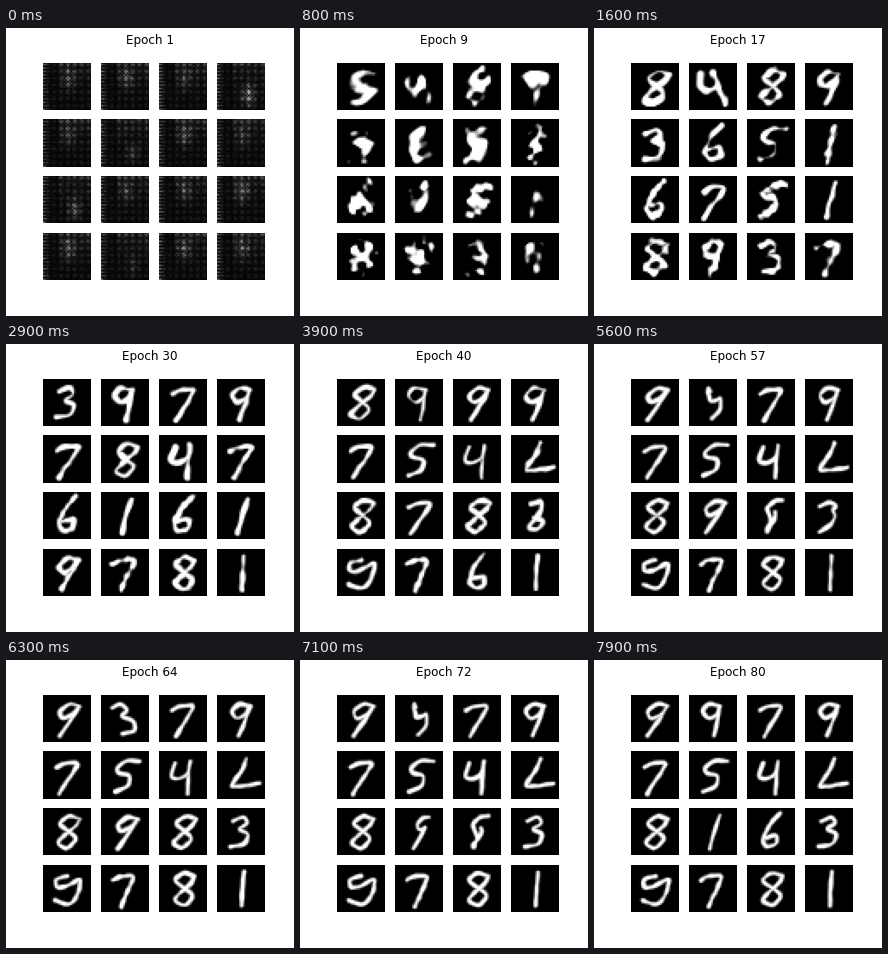
A matplotlib script that plays this animation: 288 by 288 pixels, repeating every 8000 ms.

```python
import numpy as np
import matplotlib.pyplot as plt
from matplotlib.animation import FuncAnimation

EPOCHS = 80
ROWS = COLS = 4
N = 28            # pixels per side of a digit
SAMPLES = 90

# one pen path (x, y, x, y, ...) per handwriting shape, in a box of 47 units
GLYPHS = {
    "1": (29, 8, 25, 24, 22, 41),
    "2": (19, 13, 29, 10, 30, 20, 17, 37, 29, 38, 33, 29, 23, 27),
    "3": (15, 14, 25, 9, 30, 16, 20, 22, 32, 26, 29, 37, 15, 39),
    "4": (16, 12, 11, 26, 19, 28, 29, 23, 31, 7, 29, 23, 28, 42),
    "5": (38, 10, 25, 9, 15, 17, 17, 22, 29, 24, 27, 35, 14, 40),
    "6": (32, 6, 22, 17, 15, 33, 20, 40, 30, 37, 30, 27, 19, 30),
    "7": (13, 16, 20, 12, 35, 11, 29, 22, 22, 33, 17, 42),
    "8": (36, 12, 26, 8, 15, 16, 24, 23, 34, 31, 24, 42, 13, 36, 22, 27, 33, 18, 36, 12),
    "9": (35, 12, 25, 9, 15, 17, 19, 25, 30, 20, 35, 11, 27, 27, 18, 41),
    "g": (24, 12, 12, 15, 13, 24, 24, 22, 38, 13, 35, 29, 27, 41, 12, 36),
    "L": (29, 8, 24, 20, 13, 35, 22, 35, 34, 33, 42, 32),
}

# what the sixteen cells show at each key epoch
STAGES = {
    17: "8489 3651 6751 8937",
    30: "3979 7847 6161 9781",
    40: "8999 754L 8782 g761",
    50: "9979 754L 8967 g781",
    64: "9379 754L 8983 g781",
    80: "9979 754L 8163 g781",
}
SLANT = [.1, -.4, 0, -.2,
         .05, 0, 0, 0,
         0, .1, .05, .1,
         0, -.15, -.1, -.15]

KEYS = list(STAGES)
LOW_SPOTS = {3, 5, 8, 13}   # cells whose first glow sits low on the right

rng = np.random.default_rng(7)
Y, X = np.mgrid[0:N, 0:N].astype(float)


def pen_path(name, slant):
    p = np.array(GLYPHS[name], float).reshape(-1, 2)
    for _ in range(2):      # corner cutting
        a, b = p[:-1], p[1:]
        cut = np.stack([.8 * a + .2 * b, .2 * a + .8 * b], 1).reshape(-1, 2)
        p = np.vstack([p[:1], cut, p[-1:]])
    p[:, 0] += slant * (24 - p[:, 1])
    p = p * N / 47.3 - .5
    s = np.r_[0, np.cumsum(np.hypot(*np.diff(p, axis=0).T))]
    t = np.linspace(0, s[-1], SAMPLES)
    return np.column_stack([np.interp(t, s, p[:, k]) for k in (0, 1)])


PATHS = [[pen_path(c, s) for c, s in zip(stage.replace(" ", ""), SLANT)]
         for stage in STAGES.values()]
WAVES = [(rng.normal(0, .55, (7, 2)), rng.uniform(0, 6.3, 7), rng.normal(0, .5, 7))
         for _ in SLANT]
GRAIN = rng.uniform(.4, 1, (len(SLANT), N, N))
GLOW = rng.uniform(.15, .6, len(SLANT))


def noise(i, epoch):
    """Smooth random field that drifts from epoch to epoch."""
    k, phase, speed = WAVES[i]
    arg = k[:, 0, None, None] * X + k[:, 1, None, None] * Y
    return np.sin(arg + (phase + speed * epoch)[:, None, None]).sum(0) / 2.6


def checker(i):
    """Upsampling artefacts of the untrained generator."""
    cx, cy = (18, 19) if i in LOW_SPOTS else (14.5, 9)
    dots = (.5 + .5 * np.cos(np.pi * (X - 2) / 2)) * (.5 + .5 * np.cos(np.pi * (Y - 1) / 2))
    fine = .5 + .5 * np.cos(np.pi * (X + Y))
    spot = GLOW[i] * np.exp(-((X - cx) / 3.5) ** 2 - ((Y - cy) / 6) ** 2)
    edge = .45 * np.exp(-X / 1.6) * (Y % 2)
    base = .12 + .28 * np.exp(-Y / 10) * (X > 8)
    texture = .7 * dots + .25 * fine + .08
    return np.clip((texture * (base + 1.4 * spot) * 1.2 + edge) * GRAIN[i], 0, 1)


def distance(path):
    d2 = (X[..., None] - path[:, 0]) ** 2 + (Y[..., None] - path[:, 1]) ** 2
    return np.sqrt(d2.min(-1))


def morph(i, epoch):
    j = min(np.searchsorted(KEYS, epoch, side="right") - 1, len(KEYS) - 2)
    u = (epoch - KEYS[j]) / (KEYS[j + 1] - KEYS[j])
    u = u * u * (3 - 2 * u)
    return (1 - u) * PATHS[j][i] + u * PATHS[j + 1][i]


def digit(i, epoch):
    if epoch == 1:
        return checker(i)
    e = max(epoch, KEYS[0])
    mess = np.exp((KEYS[0] - e) / 18)       # fades as training goes on
    n = noise(i, epoch)
    d = distance(morph(i, e)) + (.22 + .65 * mess) * n
    w = max(0, (KEYS[0] - epoch) / (KEYS[0] - 1))
    blob = .55 * np.hypot(X - 14, .8 * (Y - 14)) - 1.5 + 2 * n
    d = (1 - w) * d + w * blob
    ink = np.clip((1.8 + .25 * mess - d) / 1.25, 0, 1)
    ink /= max(ink.max(), .1)
    raw = max(0, (6 - epoch) / 5)
    ink = ink * (1 - .5 * raw * GRAIN[i]) + .4 * raw * checker(i)
    return np.clip(ink, 0, 1)


fig, axes = plt.subplots(ROWS, COLS, figsize=(4, 4), dpi=72)
fig.subplots_adjust(left=.125, right=.9, bottom=.125, top=.88, wspace=.2, hspace=.2)
title = fig.suptitle("Epoch 1", fontsize=12)
images = []
for ax in axes.flat:
    ax.axis("off")
    images.append(ax.imshow(np.zeros((N, N)), cmap="gray", vmin=0, vmax=1))


def update(frame):
    epoch = frame + 1
    title.set_text(f"Epoch {epoch}")
    for i, im in enumerate(images):
        im.set_data(digit(i, epoch))
    return [title, *images]


anim = FuncAnimation(fig, update, frames=EPOCHS, interval=100, repeat=True, repeat_delay=0)
plt.show()
```
